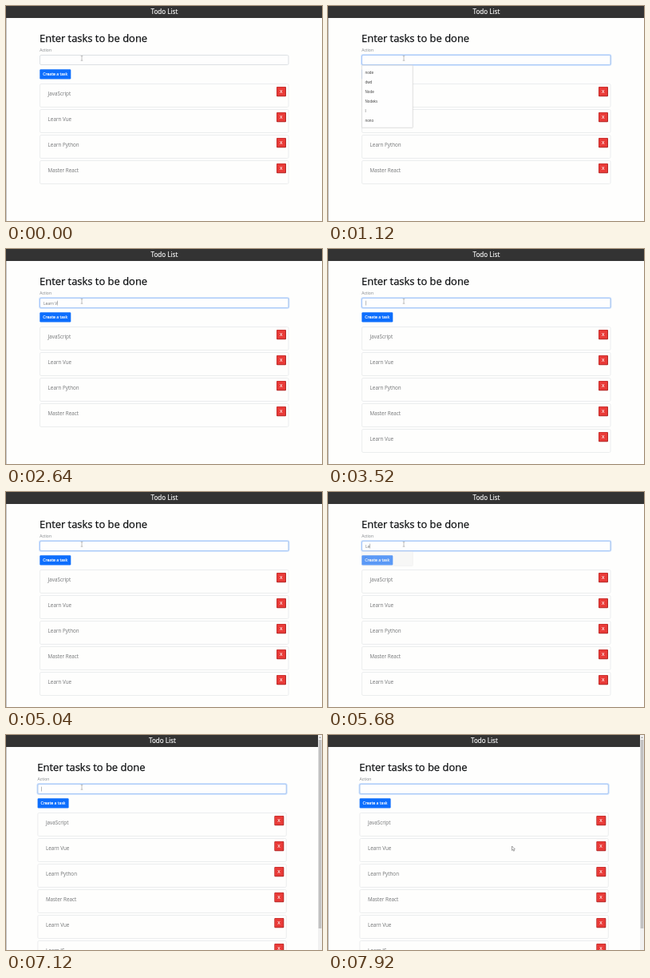
Write an HTML page with a canvas that moves like this. It is 396 px wide and 269 px high and loops after 8000 ms.

```html
<!DOCTYPE html>
<html lang="en">
<head>
<meta charset="utf-8">
<title>Todo List</title>
<style>
html, body { margin: 0; width: 100%; height: 100%; overflow: hidden; background: #fefefd; }
canvas { display: block; width: 396px; height: 269px; }
</style>
</head>
<body>
<canvas id="stage"></canvas>
<script>
const W = 396, H = 269, LOOP = 8000, BLINK = 505;
const canvas = document.getElementById('stage');
const ctx = canvas.getContext('2d');
const dpr = window.devicePixelRatio || 1;
canvas.width = W * dpr;
canvas.height = H * dpr;

const FONT = '"Open Sans", "Noto Sans", sans-serif';
const ITEMS = ['JavaScript', 'Learn Vue', 'Learn Python', 'Master React'];
const HINTS = ['node', 'dwd', 'Node', 'Nodeks', 'l', 'nono'];
const FOCUS = 400, OPEN = 960, ADD_FIRST = 3520, ADD_SECOND = 6960;

// [time, input value]
const TYPING = [
  [0, ''], [1440, 'L'], [1760, 'Le'], [1900, 'Lea'], [2080, 'Lear'], [2240, 'Learn'],
  [2400, 'Learn '], [2640, 'Learn V'], [2880, 'Learn Vu'], [3040, 'Learn Vue'], [ADD_FIRST, ''],
  [5360, 'L'], [5600, 'Le'], [5920, 'Lea'], [6160, 'Lear'], [6240, 'Learn'],
  [6560, 'Learn '], [6640, 'Learn J'], [6800, 'Learn JS'], [ADD_SECOND, '']
];

// [time, x, y]
const MOUSE = [[7200, 95, 65.6], [7440, 128, 92], [7680, 196, 130], [7900, 230.5, 139]];

const clamp = v => Math.max(0, Math.min(1, v));
const ramp = (t, start, length) => clamp((t - start) / length);

function text(str, x, y, size, color, { weight = 400, align = 'left', stroke = 0 } = {}) {
  ctx.font = `${weight} ${size}px ${FONT}`;
  ctx.fillStyle = ctx.strokeStyle = color;
  ctx.textAlign = align;
  ctx.fillText(str, x, y);
  if (stroke) {
    ctx.lineWidth = stroke;
    ctx.strokeText(str, x, y);
  }
}

function box(x, y, w, h, r, fill, stroke, line = 1) {
  ctx.beginPath();
  ctx.roundRect(x, y, w, h, r);
  if (fill) {
    ctx.fillStyle = fill;
    ctx.fill();
  }
  if (stroke) {
    ctx.strokeStyle = stroke;
    ctx.lineWidth = line;
    ctx.stroke();
  }
}

function drawHeader(width) {
  ctx.fillStyle = '#333333';
  ctx.fillRect(0, 0, width, 15);
  text('Todo List', width / 2 + 0.4, 10.1, 8.1, '#fff', { align: 'center', stroke: 0.15 });
}

function drawRow(label, i) {
  const y = 97 + i * 32;
  box(42.5, y + 0.5, 311.5, 29, 1.5, '#fefefd', '#e8eaeb', 0.8);
  text(label, 52.6, y + 14.9, 6.3, '#707274');
  box(339, y + 4, 12, 12.2, 1, '#b22a28');
  box(339.6, y + 4.6, 10.4, 10.6, 0.6, '#e93b38');
  text('X', 344.8, y + 12.2, 5.6, '#fff', { weight: 600, align: 'center' });
}

function caretOn(t, keyTime) {
  const since = t - Math.max(FOCUS, keyTime);
  return t >= FOCUS && Math.floor(since / BLINK) % 2 === 0;
}

function drawInput(t, value, keyTime) {
  const focus = ramp(t, FOCUS, 200);
  ctx.globalAlpha = focus;
  box(41.2, 60.2, 314.1, 14.6, 2.4, '#c6ddfe');
  ctx.globalAlpha = 1;
  box(42.5, 61.5, 311.5, 12, 1.5, '#fefefe', '#d5dade', 0.8);
  ctx.globalAlpha = focus;
  box(42.5, 61.5, 311.5, 12, 1.5, null, '#9dc4fd', 0.8);
  ctx.globalAlpha = 1;
  text(value, 47, 69.6, 4.9, '#707478');
  if (caretOn(t, keyTime)) {
    const x = 47 + ctx.measureText(value).width;
    ctx.fillStyle = '#707478';
    ctx.fillRect(x, 64.7, 0.5, 5.8);
  }
}

function drawHints(list, alpha) {
  if (!alpha) return;
  const h = 6 + list.length * 12;
  ctx.save();
  ctx.globalAlpha = alpha;
  ctx.shadowColor = 'rgba(0,0,0,.14)';
  ctx.shadowBlur = 1.5 * dpr;
  ctx.shadowOffsetY = 0.4 * dpr;
  box(42.4, 74.2, 63.8, h, 0.5, '#fefefe');
  ctx.restore();
  ctx.globalAlpha = alpha;
  box(42.4, 74.2, 63.8, h, 0.5, null, '#d4d4d4', 0.6);
  list.forEach((s, i) => text(s, 46.5, 84.6 + i * 12, 4.4, '#333'));
  ctx.globalAlpha = 1;
}

function hintsAt(t, value, keyTime) {
  if (t >= OPEN && t < 1440) return [HINTS, ramp(t, OPEN, 140)];
  if (value === 'L') return [['l'], 1];
  if (value === 'Le') return [['l'], 1 - ramp(t, keyTime, 120)];
  return [[], 0];
}

function drawScrollbar() {
  ctx.fillStyle = '#f1f1f1';
  ctx.fillRect(391, 0, 5, H);
  box(391.6, 6, 3.8, 236, 0, '#c1c1c1');
  ctx.fillStyle = '#777';
  ctx.beginPath();
  ctx.moveTo(392.2, 3.8);
  ctx.lineTo(393.5, 2.2);
  ctx.lineTo(394.8, 3.8);
  ctx.fill();
}

function mouseAt(t) {
  if (t <= MOUSE[0][0]) return MOUSE[0].slice(1);
  const i = MOUSE.findIndex(p => p[0] > t);
  if (i < 0) return MOUSE[MOUSE.length - 1].slice(1);
  const [t0, x0, y0] = MOUSE[i - 1], [t1, x1, y1] = MOUSE[i];
  const k = (t - t0) / (t1 - t0);
  return [x0 + (x1 - x0) * k, y0 + (y1 - y0) * k];
}

function drawMouse(t) {
  const [x, y] = mouseAt(t);
  ctx.save();
  ctx.translate(x, y);
  ctx.beginPath();
  if (y < 74) {
    ctx.moveTo(-1.3, -3);
    ctx.lineTo(1.3, -3);
    ctx.moveTo(0, -3);
    ctx.lineTo(0, 2.6);
    ctx.moveTo(-1.3, 2.6);
    ctx.lineTo(1.3, 2.6);
    ctx.strokeStyle = '#999';
    ctx.lineWidth = 0.6;
  } else {
    const tip = [[0, 0], [0, 5.4], [1.2, 4.3], [2.1, 6.2], [3, 5.8], [2.2, 3.9], [3.8, 3.8]];
    tip.forEach(p => ctx.lineTo(...p));
    ctx.closePath();
    ctx.fillStyle = '#fff';
    ctx.fill();
    ctx.strokeStyle = '#666';
    ctx.lineWidth = 0.6;
  }
  ctx.stroke();
  ctx.restore();
}

function draw(t) {
  const [keyTime, value] = TYPING.filter(k => k[0] <= t).pop();
  const scrolls = t >= ADD_SECOND;
  const rows = ITEMS.slice();
  if (t >= ADD_FIRST) rows.push('Learn Vue');
  if (scrolls) rows.push('Learn JS');

  ctx.setTransform(dpr, 0, 0, dpr, 0, 0);
  ctx.fillStyle = '#fefefd';
  ctx.fillRect(0, 0, W, H);
  ctx.fillStyle = '#b4b4b4';
  ctx.fillRect(0, 14, 0.8, H);
  drawHeader(scrolls ? 391 : W);

  ctx.save();
  if (scrolls) ctx.translate(-2.7, 0);
  text('Enter tasks to be done', 42, 45.2, 12.95, '#0c0e10', { stroke: 0.25 });
  text('Action', 42.3, 56.5, 5, '#7b7f83');
  drawInput(t, value, keyTime);
  box(42.3, 79.3, 39, 12.2, 1.2, '#0d6efd');
  text('Create a task', 46.2, 87.3, 5.15, '#fff', { stroke: 0.15 });
  rows.forEach(drawRow);
  drawHints(...hintsAt(t, value, keyTime));
  ctx.restore();

  if (scrolls) drawScrollbar();
  drawMouse(t);
}

const start = performance.now();
function tick() {
  draw((performance.now() - start) % LOOP);
  requestAnimationFrame(tick);
}
tick();
</script>
</body>
</html>
```
